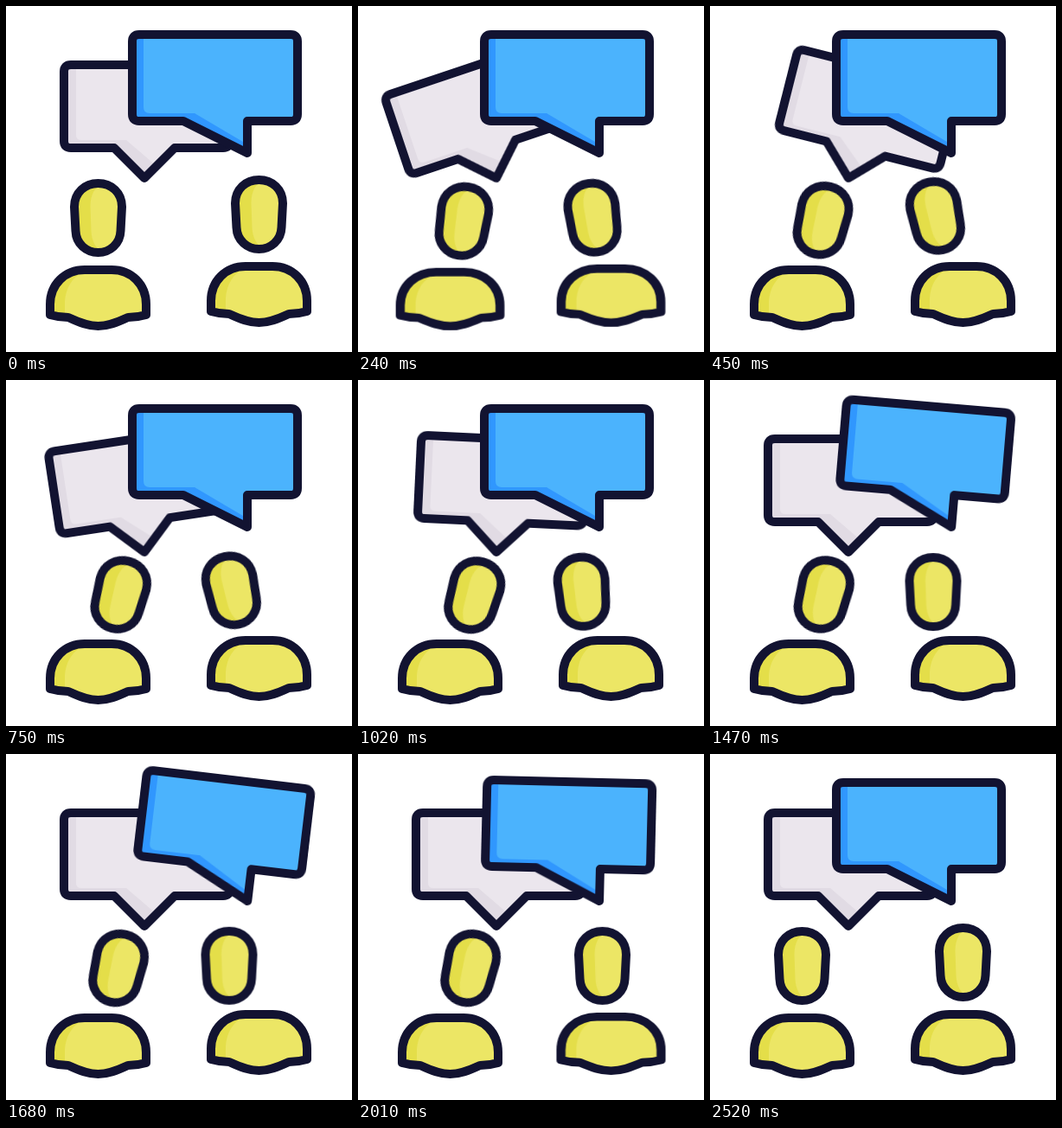
These frames come from a looping animation (400 by 400 pixels, 2.55 s). An HTML page:

```html
<!DOCTYPE html>
<html lang="en">
<head>
<meta charset="utf-8">
<title>Conversation</title>
<style>
  html, body { margin: 0; width: 100%; height: 100%; overflow: hidden; background: #fff; }
  svg { display: block; width: 100%; height: 100%; }

  .line { fill: none; stroke: #121331; stroke-width: 10; stroke-linejoin: round; }
  .skin { fill: #ece665; }
  .skin-shade { fill: #e4de49; }
  .grey { fill: #ebe6ed; }
  .grey-shade { fill: #e1dbe4; }
  .blue { fill: #4bb3fd; }
  .blue-shade { fill: #3097fe; }

  .move {
    animation: 2550ms cubic-bezier(.37, 0, .63, 1) infinite;
  }
  .reply { transform-origin: 160px 199px; animation-name: swing; }
  .speech { transform-origin: 279px 172px; animation-name: swing; animation-delay: -1458ms; }
  .body { transform-origin: 106.5px 375px; }
  .left .body { animation-name: squash-left; }
  .left .bob { animation-name: bob-left; }
  .left .head { transform-origin: 106.5px 346px; animation-name: lean-left; }
  .right .body { animation-name: squash-right; }
  .right .bob { animation-name: bob-right; }
  .right .head { transform-origin: 106.5px 245px; animation-name: lean-right; }

  @keyframes swing {
    0%, 47.57%, 100% { transform: rotate(0deg); }
    8.04% { transform: rotate(-20deg); }
    18.75% { transform: rotate(15deg); }
    29.53% { transform: rotate(-8.6deg); }
    38.16% { transform: rotate(3deg); }
  }

  @keyframes squash-left {
    0%, 15.7%, 78.8%, 94.9%, 100% { transform: scale(1); }
    8%, 86.3% { transform: scale(1.042, .96); }
  }
  @keyframes squash-right {
    0%, 15.7%, 68.6%, 85.5%, 100% { transform: scale(1); }
    8%, 78.6% { transform: scale(1.042, .96); }
  }
  @keyframes bob-left {
    0%, 15.7%, 78.8%, 94.9%, 100% { transform: translateY(0); }
    8%, 86.3% { transform: translateY(2.8px); }
  }
  @keyframes bob-right {
    0%, 15.7%, 68.6%, 85.5%, 100% { transform: translateY(0); }
    8%, 78.6% { transform: translateY(2.8px); }
  }

  @keyframes lean-left {
    0%, 94.9%, 100% { transform: rotate(0deg); }
    15.7% { transform: rotate(13.2deg); animation-timing-function: linear; }
    47% { transform: rotate(16.7deg); }
    63.5%, 78.8% { transform: rotate(13.2deg); }
  }
  @keyframes lean-right {
    0%, 84.7%, 100% { transform: translate(0, 0) rotate(0deg); }
    15.7% { transform: translate(-31.5px, 1.8px) rotate(-12deg); }
    31.4% { transform: translate(-31.5px, 2.3px) rotate(-12deg); }
    47% { transform: translate(-34.5px, 4.8px) rotate(0deg); }
    63.5%, 68.6% { transform: translate(-34.5px, 3.8px) rotate(0deg); }
  }
</style>
</head>
<body>
<svg viewBox="0 0 400 400">
  <defs>
    <path id="head" d="M79 232C79 216 91 205 106.5 205S134 216 134 232L132.5 260C132 275 120 285 106.5 285S81 275 80.5 260Z"/>
    <path id="body" d="M51 357V345C51 322 68 305 91 305H122C145 305 162 322 162 345V357Q152 360 141 360C128 366 118 370 106.5 370S85 366 72 360Q61 360 51 357Z"/>
    <path id="grey" d="M75 68H251Q259 68 259 76V156Q259 164 251 164H195L160 199L125 164H75Q67 164 67 156V76Q67 68 75 68Z"/>
    <path id="blue" d="M154 33H329Q337 33 337 41V125Q337 133 329 133H279V170L205 133H154Q146 133 146 125V41Q146 33 154 33Z"/>

    <g id="face">
      <use href="#head" class="skin-shade"/>
      <path class="skin" d="M112 206C125 206 134 217 134 232L132.5 260C132 275 124 284 113 284C104 282 99 272 98.5 260L97.5 232C97.5 218 103 208 112 206Z"/>
      <use href="#head" class="line"/>
    </g>
    <g id="torso">
      <use href="#body" class="skin-shade"/>
      <path class="skin" d="M68 359V345C68 324 80 307 100 305H122C145 305 162 322 162 345V357Q152 360 141 360C128 366 118 368 106.5 368S85 365 68 359Z"/>
      <use href="#body" class="line"/>
    </g>
    <g id="person">
      <g class="move bob"><g class="move head"><use href="#face"/></g></g>
      <g class="move body"><use href="#torso"/></g>
    </g>
  </defs>

  <g class="move reply">
    <use href="#grey" class="grey-shade"/>
    <path class="grey" d="M81 68H251Q259 68 259 76V156Q259 164 251 164H195L174 185L139 155H87Q81 155 81 149Z"/>
    <use href="#grey" class="line"/>
  </g>

  <g class="move speech">
    <use href="#blue" class="blue-shade"/>
    <path class="blue" d="M159 33H329Q337 33 337 41V125Q337 133 329 133H279V160L218 124H166Q159 124 159 117Z"/>
    <use href="#blue" class="line"/>
  </g>

  <g class="left">
    <g class="move bob"><g class="move head"><use href="#face"/></g></g>
    <g class="move body"><use href="#torso"/></g>
  </g>
  <g class="right" transform="translate(186 -4)">
    <g class="move bob"><g class="move head"><use href="#face"/></g></g>
    <g class="move body"><use href="#torso"/></g>
  </g>
</svg>
</body>
</html>
```
